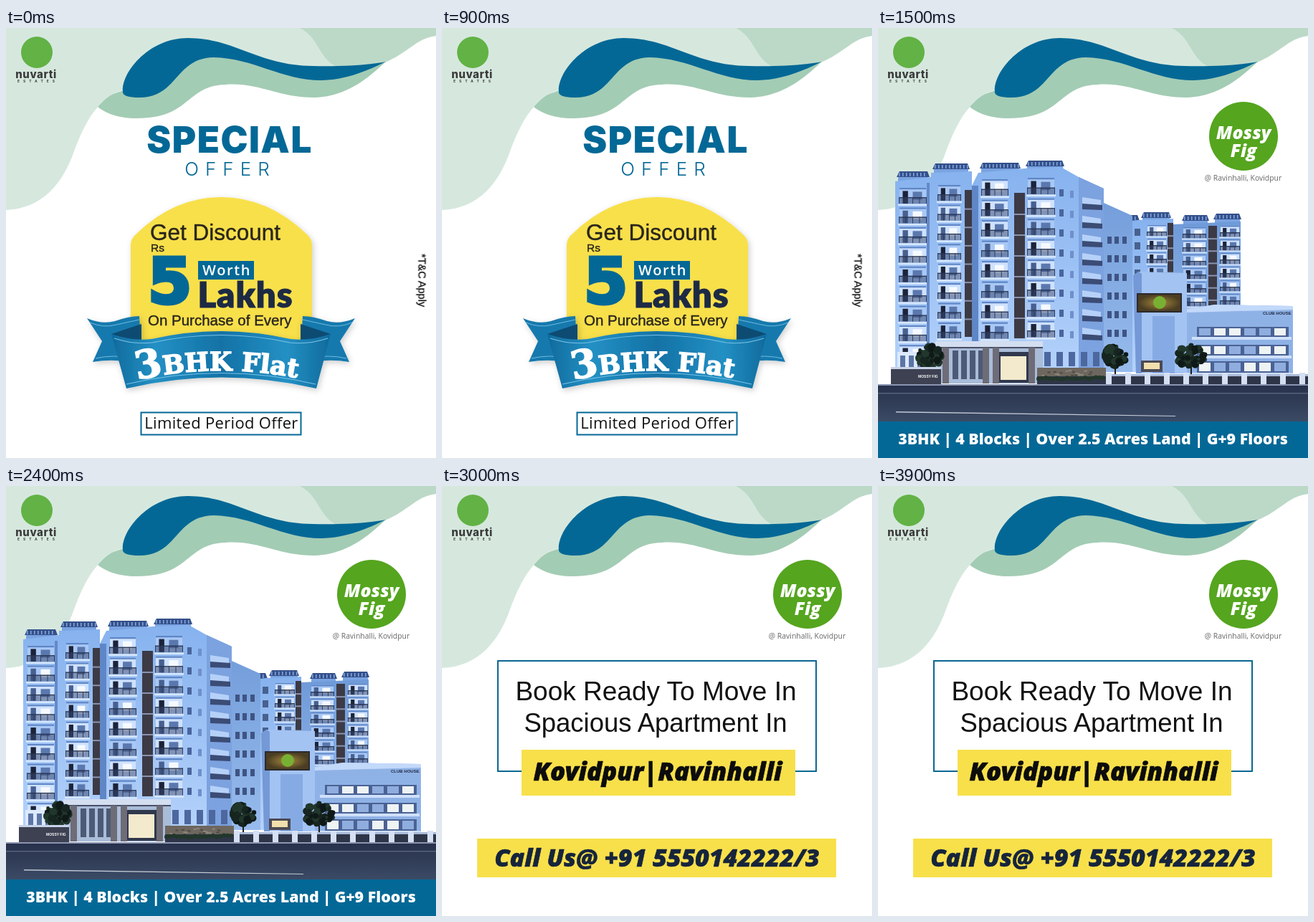
An HTML page that plays this animation: 600x600 px, repeating every 4.5 s.

```html
<!DOCTYPE html>
<html lang="en">
<head>
<meta charset="utf-8">
<title>Special offer</title>
<style>
  html, body { margin: 0; width: 100%; height: 100%; overflow: hidden; background: #fff; }
  svg { display: block; width: 100vw; height: 100vh; }
  .arial { font-family: "Liberation Sans", Arial, sans-serif; }
  .open { font-family: "Open Sans", "Noto Sans", sans-serif; }
  .inter { font-family: Inter, Roboto, sans-serif; }
  .heavy { font: italic 800 35px "Open Sans", "Noto Sans", sans-serif; stroke-width: .6; }
  .mid { text-anchor: middle; }
  .scene { opacity: 0; }
</style>
</head>
<body>
<svg viewBox="0 0 600 600" xmlns="http://www.w3.org/2000/svg">
  <defs>
    <filter id="soft" x="-20%" y="-20%" width="140%" height="140%">
      <feDropShadow dx="2" dy="3" stdDeviation="4" flood-color="#000" flood-opacity=".2"/>
    </filter>
    <linearGradient id="band">
      <stop offset="0" stop-color="#0f6a9c"/>
      <stop offset=".2" stop-color="#2490c4"/>
      <stop offset=".5" stop-color="#1272a6"/>
      <stop offset=".8" stop-color="#2490c4"/>
      <stop offset="1" stop-color="#0f6a9c"/>
    </linearGradient>
    <linearGradient id="wall" x2="0" y2="1">
      <stop offset="0" stop-color="#86b2ee"/>
      <stop offset="1" stop-color="#b4d2fb"/>
    </linearGradient>
    <linearGradient id="shade" x2="0" y2="1">
      <stop offset="0" stop-color="#6f9ad8"/>
      <stop offset="1" stop-color="#97bbec"/>
    </linearGradient>
    <linearGradient id="road" x2="0" y2="1">
      <stop offset="0" stop-color="#27304a"/>
      <stop offset="1" stop-color="#3b4a65"/>
    </linearGradient>
    <radialGradient id="board">
      <stop offset="0" stop-color="#a88a3c"/>
      <stop offset="1" stop-color="#4a3d22"/>
    </radialGradient>
    <path id="arc" d="M183 491Q300 465 420 491"/>
    <g id="tail">
      <path d="M113 405Q134 414 152 409Q172 402 186 402L189 450L178 467Q150 461 121 466L134 437Z" fill="#1879ad"/>
      <path d="M117 411Q136 419 154 414L186 407M125 461Q150 455 178 461" fill="none" stroke="#6cbbe2"/>
      <path d="M147 427L189 413V440Z" fill="#0b4b73"/>
    </g>
  </defs>

  <rect width="600" height="600" fill="#fff"/>
  <path d="M120 102C136 122 166 129 200 125C252 120 255 86 295 80C350 72 375 97 430 97C475 96 505 70 530 47L430 60L260 28L170 85Z" fill="#a3ccb4"/>
  <path d="M0 0H600V11C572 14 560 36 528 48C490 66 430 66 385 56C340 40 300 26 250 26C205 28 190 60 175 85C152 88 142 95 130 108C114 125 104 148 95 172C80 215 52 252 0 254Z" fill="#d6e8de"/>
  <path d="M410 0H600V11C572 14 560 36 528 48Q500 55 470 57C435 48 440 15 410 0Z" fill="#bcd9c8"/>
  <path d="M163 90C160 62 200 14 253 14C320 14 350 52 428 53C465 54 505 52 530 47C500 62 470 73 440 73C385 73 345 42 290 41C235 42 240 97 186 97Q164 97 163 90Z" fill="#046896"/>

  <circle cx="43" cy="34" r="22" fill="#62b245"/>
  <g class="inter mid" fill="#3b3b3b">
    <text x="42" y="70" font-size="15" font-weight="800" letter-spacing=".6">nuvarti</text>
    <text x="44.5" y="75.5" font-size="5" font-weight="700" letter-spacing="5">ESTATES</text>
  </g>

  <g class="scene" data-on="100">
    <g class="inter mid" fill="#046896">
      <text x="312" y="174" font-size="51" font-weight="900" letter-spacing="1.5">SPECIAL</text>
      <text x="313" y="206" font-size="26" font-weight="300" letter-spacing="9">OFFER</text>
    </g>
    <path d="M174 460V303Q174 294 181 288Q234 236 300 236Q366 236 420 288Q427 294 427 303V460Z" fill="#f8e04b" filter="url(#soft)"/>
    <g class="arial" fill="#29251c" stroke="#29251c" stroke-width=".4">
      <text x="201" y="296" font-size="31.5">Get Discount</text>
      <text x="202" y="312" font-size="15.5">Rs</text>
      <text x="198" y="415" font-size="20.5">On Purchase of Every</text>
    </g>
    <text x="198" y="384" font-family="DejaVu Sans, sans-serif" font-size="88" font-weight="700" fill="#046896" stroke="#046896" stroke-width="5">5</text>
    <rect x="268" y="325" width="78" height="26" fill="#046896"/>
    <text class="open mid" x="308" y="345" font-size="20" font-weight="600" letter-spacing="1.6" fill="#fff">Worth</text>
    <text class="mid" x="334" y="390" font-family="Lato, sans-serif" font-size="49" font-weight="900" letter-spacing="1" fill="#1d2a44" stroke="#1d2a44">Lakhs</text>

    <g filter="url(#soft)">
      <use href="#tail"/>
      <use href="#tail" transform="matrix(-1 0 0 1 600 0)"/>
      <path d="M147 427Q175 437 203 434Q300 412 397 434Q425 437 453 427L433 503Q300 472 168 503Z" fill="url(#band)"/>
      <path d="M151 433Q178 442 204 439Q300 418 396 439Q422 442 449 433M168 497Q300 466 432 497" fill="none" stroke="#79c3e8" stroke-width="1.2"/>
    </g>
    <text font-family="DejaVu Serif, serif" font-weight="700" font-size="36" fill="#fff" stroke="#fff" stroke-width="1.6">
      <textPath href="#arc"><tspan font-size="54">3</tspan>BHK Flat</textPath>
    </text>

    <rect x="188.5" y="536.5" width="223" height="31" fill="#fff" stroke="#046896" stroke-width="2"/>
    <text class="open mid" x="300.5" y="558.5" font-size="22" letter-spacing=".3" fill="#111">Limited Period Offer</text>
    <text class="arial" transform="translate(575.5 315) rotate(90)" font-size="14.5" fill="#111" stroke="#111" stroke-width=".3">*T&amp;C Apply</text>
  </g>

  <g class="scene" data-on="010">
    <g id="site"></g>
    <rect y="549" width="600" height="51" fill="#046896"/>
    <text class="open mid" x="300" y="581" font-size="21.4" font-weight="800" fill="#fff">3BHK | 4 Blocks | Over 2.5 Acres Land | G+9 Floors</text>
  </g>

  <g class="scene" data-on="001">
    <rect x="78" y="244" width="444" height="154" fill="#fff" stroke="#0b6792" stroke-width="2"/>
    <g class="arial mid" fill="#111">
      <text x="298.5" y="299" font-size="37">Book Ready To Move In</text>
      <text x="298" y="343" font-size="36.5">Spacious Apartment In</text>
    </g>
    <rect x="111" y="368" width="382" height="64" fill="#f8e04b"/>
    <text class="heavy mid" x="301" y="411" fill="#0c0c0c" stroke="#0c0c0c">Kovidpur|Ravinhalli</text>
    <rect x="49" y="492" width="501" height="54" fill="#f8e04b"/>
    <text class="heavy mid" x="300" y="531" style="font-size: 34px" fill="#16243c" stroke="#16243c">Call Us@ +91 5550142222/3</text>
  </g>

  <g class="scene" data-on="011">
    <circle cx="510" cy="151" r="48" fill="#55a51f"/>
    <g class="open mid" font-size="25" font-weight="800" font-style="italic" fill="#fff">
      <text x="510" y="155">Mossy</text>
      <text x="510" y="180">Fig</text>
    </g>
    <text class="open mid" x="509.5" y="213" font-size="10.4" fill="#666">@ Ravinhalli, Kovidpur</text>
  </g>
</svg>

<script>
const STEPS = 3, LOOP = 4500;
let out = '', seed = 11;
const rnd = () => (seed = seed * 16807 % 2147483647) / 2147483647;
const rect = (x, y, w, h, fill) => out += `<rect x="${x}" y="${y}" width="${w}" height="${h}" fill="${fill}"/>`;
const poly = (points, fill) => out += `<polygon points="${points}" fill="${fill}"/>`;
const text = (x, y, size, fill, s) => out += `<text class="arial" x="${x}" y="${y}" font-size="${size}" font-weight="700" fill="${fill}">${s}</text>`;

// A stack of balconies with a door, a window and a railing
function bay(x, y, w, n, pitch) {
  for (let i = 0; i < n; i++) {
    const t = y + i * pitch, h = pitch * .8;
    rect(x, t, w, h, rnd() < .5 ? '#cfe2ff' : '#a9c8f5');
    rect(x, t, w, pitch * .08, '#5f86c6');
    rect(x + w * .12, t + h * .2, w * .2, h * .8, rnd() < .6 ? '#1c2338' : '#48608f');
    rect(x + w * .5, t + h * .25, w * .35, h * .5, rnd() < .5 ? '#f6faff' : '#5b78ae');
    const top = t + h * .6, rail = h * .42;
    rect(x - 1, top, w + 2, rail, 'rgba(52,70,110,.5)');
    rect(x - 1, top, w + 2, 1.2, '#26324f');
    for (let k = 0; k <= 4; k++) rect(x - 1 + k * (w + 1) / 4, top, 1, rail, '#303d5c');
    rect(x - 2, t + h + pitch * .02, w + 4, pitch * .1, '#d6e7ff');
  }
}

function column(x, y, w, h, n) {
  rect(x, y, w, h, '#3c3a45');
  for (let i = 1; i < n; i++) rect(x, y + i * h / n, w, 2, '#8a93ae');
}

function pergola(x, y, w) {
  rect(x + 2, y, w - 4, 14, '#7aa3e2');
  poly(`${x},${y + 6} ${x + 4},${y - 2} ${x + w - 3},${y - 2} ${x + w},${y + 6}`, '#34508a');
  for (let k = 3; k < w - 3; k += 5) rect(x + k, y, 1.5, 5, '#86a9e0');
}

function tree(x, y, r) {
  rect(x - 1, y, 2, 488 - y, '#1c1c1a');
  for (let i = 0; i < 60; i++) {
    const a = rnd() * 6.283, d = Math.sqrt(rnd()) * r;
    const fill = ['#16251f', '#22372b', '#0f1918'][i % 3];
    out += `<circle cx="${x + Math.cos(a) * d}" cy="${y + Math.sin(a) * d * .85}" r="${2 + rnd() * 4}" fill="${fill}"/>`;
  }
}

function rearBlock() {
  [[325, 263, 40], [367, 259, 42], [424, 263, 38], [468, 261, 39]].forEach(p => pergola(...p));
  poly('315,274 362,268 412,266 412,480 315,480', 'url(#wall)');
  poly('412,274 506,270 506,480 412,480', 'url(#shade)');
  bay(324, 278, 26, 8, 19);
  bay(376, 275, 26, 8, 19);
  bay(426, 278, 31, 8, 19);
  bay(478, 276, 26, 8, 19);
  for (let i = 0; i < 8; i++) rect(358, 280 + i * 19, 8, 10, '#48618f');
  column(404, 272, 8, 120, 7);
  column(461, 276, 12, 120, 7);
}

function frontBlocks() {
  pergola(26, 202, 46);
  pergola(76, 191, 52);
  poly('24,214 74,208 74,202 131,200 131,480 24,480', 'url(#wall)');
  bay(30, 223, 37, 9, 27.4);
  bay(84, 219, 31, 9, 27.4);
  column(121, 226, 10, 205, 8);
  rect(68, 216, 4, 241, '#6489c8');

  poly('280,208 315,224 315,244 355,262 355,480 280,480', 'url(#shade)');
  poly('280,208 315,224 315,480 280,480', '#7ca2df');
  for (let i = 0; i < 8; i++) {
    const y = 236 + i * 26;
    poly(`285,${y} 311,${y + 4} 311,${y + 17} 285,${y + 15}`, '#b6d1f8');
    poly(`285,${y + 9} 313,${y + 11} 313,${y + 18} 285,${y + 17}`, '#3b4c75');
    if (i > 1) for (const x of [320, 330, 341]) rect(x, y + 3, 6, 10, '#3f5484');
  }

  pergola(142, 190, 57);
  pergola(206, 187, 54);
  poly('131,220 140,202 205,196 255,194 280,208 280,480 131,480', 'url(#wall)');
  rect(131, 220, 9, 240, '#5f86c6');
  bay(145, 211, 36, 8, 28.5);
  bay(209, 209, 37, 8, 28.5);
  column(190, 230, 15, 203, 7);
  for (let i = 0; i < 8; i++) {
    rect(253, 225 + i * 28, 6, 10, '#4a659d');
    rect(268, 227 + i * 28, 5, 10, '#6f90cc');
  }
}

function entrance() {
  rect(27, 452, 54, 28, '#dce9ff');
  for (let x = 31; x < 76; x += 12) rect(x, 457, 7, 18, '#5d75a5');
  rect(82, 442, 148, 54, '#a9bcd8');
  for (let x = 104; x < 142; x += 12) rect(x, 450, 8, 40, '#4d5a76');
  rect(168, 452, 42, 43, '#30384d');
  rect(171, 458, 36, 33, '#f3e9cd');
  rect(80, 437, 150, 9, '#d3def0');
  rect(80, 445, 150, 2, '#4a5068');
  for (const x of [90, 146, 160, 210]) rect(x, 446, 9, 50, '#6e6c77');
  for (let x = 232; x < 310; x += 17) rect(x, 452, 9, 20, '#4d689f');
}

function clubHouse() {
  poly('431,392 470,386 579,388 579,482 431,482', '#8fb2e6');
  poly('431,392 470,386 579,388 579,393 431,397', '#c3d9fa');
  [[417, 14], [442, 15], [465, 16]].forEach(([y, h]) => {
    rect(445, y, 128, h, '#4a6294');
    for (let x = 448; x < 570; x += 21) rect(x, y + 2, 16, h - 4, rnd() < .6 ? '#eef3f4' : '#8fadde');
    rect(438, y + h, 139, 4, '#cfe0fb');
  });
  text(537, 400, 6, '#1f2a44', 'CLUB HOUSE');
  poly('356,345 364,340 431,342 431,482 360,482', '#a3c3f3');
  poly('356,345 364,340 368,343 368,482 360,482', '#7599d6');
  rect(383, 402, 31, 80, '#86abe4');
  rect(361, 370, 63, 27, '#2c2a2e');
  rect(363, 372, 59, 23, 'url(#board)');
  out += '<circle cx="393" cy="383" r="9" fill="#78b033"/>';
  rect(367, 464, 30, 16, '#4b4a55');
  rect(371, 467, 22, 9, '#f1dfae');
}

function street() {
  tree(72, 459, 18);
  tree(331, 458, 16);
  tree(437, 459, 20);
  rect(18, 475, 70, 22, '#3d4152');
  rect(18, 473, 70, 3, '#c8d3e8');
  text(56, 488, 5, '#fff', 'MOSSY FIG');
  rect(222, 474, 96, 24, '#6d675f');
  for (let i = 0; i < 44; i++) rect(223 + rnd() * 90, 476 + rnd() * 19, 4, 2, i % 2 ? '#8d867b' : '#4d4943');
  rect(222, 486, 378, 12, '#2f3548');
  for (let x = 318; x < 600; x += 27) {
    rect(x, 481, 8, 17, '#d5e0f3');
    rect(x + 8, 483, 19, 3, '#a9b9d8');
  }
  for (let x = 224; x < 316; x += 5) out += `<circle cx="${x}" cy="${487 + rnd() * 3}" r="3" fill="#22372b"/>`;
  rect(0, 497, 600, 52, 'url(#road)');
  rect(0, 497, 600, 2, '#8c95b0');
  rect(0, 509, 600, 1.5, '#56617c');
  poly('25,535 415,541 415,542 25,536.5', '#c3cad6');
}

[rearBlock, frontBlocks, entrance, clubHouse, street].forEach(draw => draw());
document.getElementById('site').innerHTML = out;

for (const el of document.querySelectorAll('.scene')) {
  const on = [...el.dataset.on];
  const keys = on.map((v, i) => ({ opacity: +v, offset: i / STEPS, easing: 'step-end' }));
  keys.push({ opacity: +on[STEPS - 1], offset: 1 });
  el.animate(keys, { duration: LOOP, iterations: Infinity }).startTime = 0;
}
</script>
</body>
</html>
```
